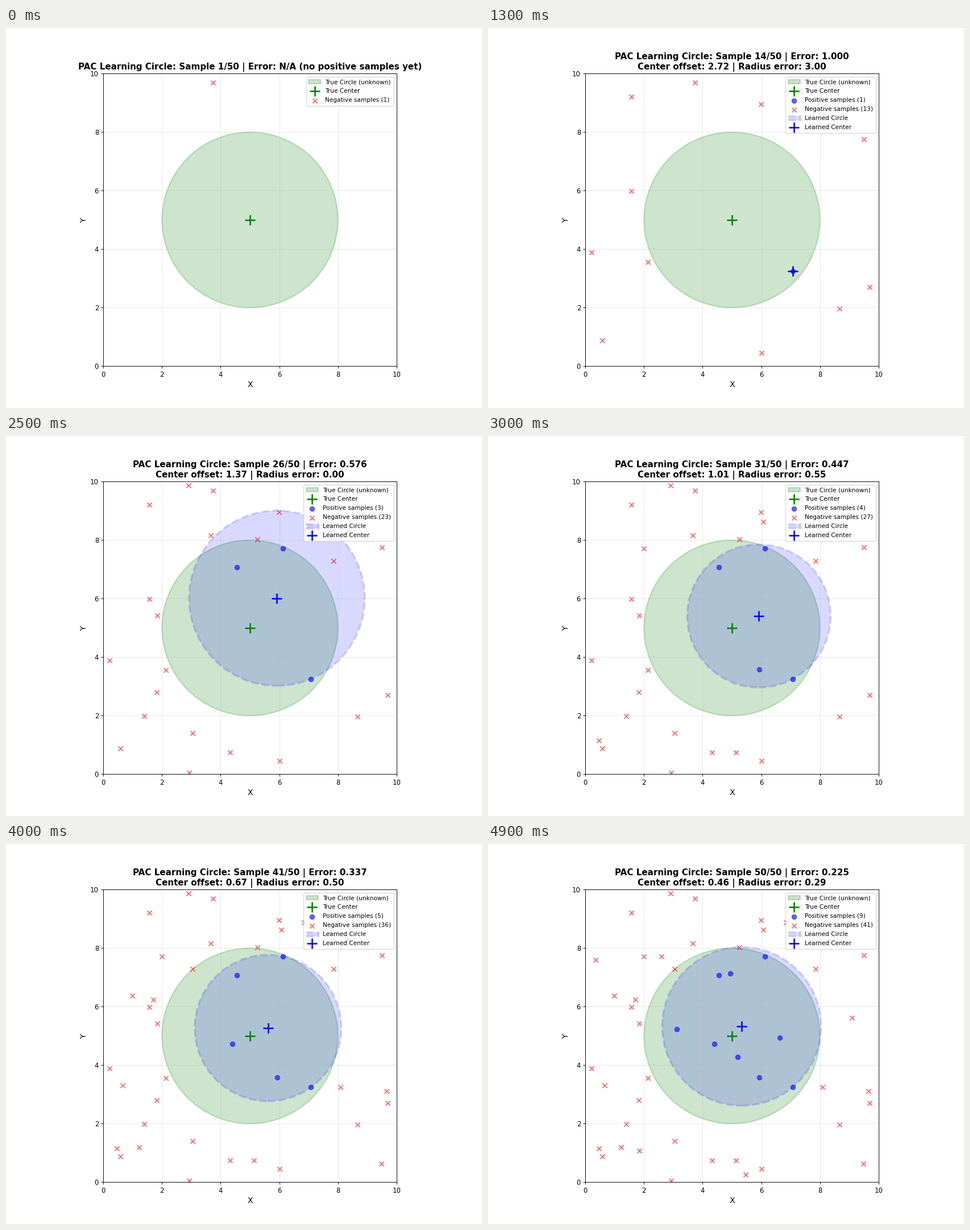
These frames come from a looping animation (837x669 px, 5000 ms). A matplotlib script:

```python
import math

import matplotlib.pyplot as plt
import numpy as np
from matplotlib.animation import FuncAnimation
from matplotlib.patches import Circle

WIDTH, HEIGHT, DPI = 837, 669, 83.7
SAMPLES, INTERVAL = 50, 100
TRUE_CENTER, TRUE_RADIUS = np.array([5.0, 5.0]), 3.0

plt.rcParams["font.family"] = "DejaVu Sans"

rng = np.random.RandomState(42)
xs = rng.rand(SAMPLES) * 10
ys = rng.rand(SAMPLES) * 10
points = np.column_stack([xs, ys])
inside = np.hypot(*(points - TRUE_CENTER).T) <= TRUE_RADIUS


def fit_circle(positives):
    """Centroid of the positives, reaching out to the farthest one."""
    center = positives.mean(axis=0)
    return center, np.hypot(*(positives - center).T).max()


def overlap_area(r1, r2, d):
    if d >= r1 + r2:
        return 0.0
    if d <= abs(r1 - r2):
        return math.pi * min(r1, r2) ** 2
    d1 = (d * d + r1 * r1 - r2 * r2) / (2 * d)
    d2 = d - d1
    segments = r1 * r1 * math.acos(d1 / r1) + r2 * r2 * math.acos(d2 / r2)
    return segments - d * math.sqrt(r1 * r1 - d1 * d1)


def relative_error(radius, offset):
    """Symmetric difference of both circles over the true area."""
    true_area = math.pi * TRUE_RADIUS ** 2
    shared = overlap_area(TRUE_RADIUS, radius, offset)
    return (true_area + math.pi * radius ** 2 - 2 * shared) / true_area


def draw_center(center, color, label):
    ax.plot(*center, "+", color=color, markersize=15, markeredgewidth=2.2,
            label=label)


def draw_samples(group, color, marker, kind):
    if len(group):
        ax.scatter(*group.T, c=color, marker=marker, s=50, alpha=0.6,
                   label=f"{kind} samples ({len(group)})")


# A hair over the height keeps the pixel count from rounding down.
fig = plt.figure(figsize=(WIDTH / DPI, (HEIGHT + 0.001) / DPI), dpi=DPI)
ax = fig.add_axes([0.2045, 0.11, 0.616, 0.77])


def update(frame):
    count = frame + 1
    seen, hit = points[:count], inside[:count]
    positives = seen[hit]

    ax.clear()
    ax.set(xlim=(0, 10), ylim=(0, 10))
    ax.grid(True, alpha=0.3)
    ax.set_xlabel("X", fontsize=12)
    ax.set_ylabel("Y", fontsize=12)

    ax.add_patch(Circle(TRUE_CENTER, TRUE_RADIUS, color="green", alpha=0.2,
                        linewidth=2, label="True Circle (unknown)"))
    draw_center(TRUE_CENTER, "green", "True Center")
    draw_samples(positives, "blue", "o", "Positive")
    draw_samples(seen[~hit], "red", "x", "Negative")

    title = f"PAC Learning Circle: Sample {count}/{SAMPLES} | Error: "
    if len(positives):
        center, radius = fit_circle(positives)
        offset = math.hypot(*(center - TRUE_CENTER))
        ax.add_patch(Circle(center, radius, color="blue", alpha=0.15,
                            linestyle="--", linewidth=3,
                            label="Learned Circle"))
        draw_center(center, "blue", "Learned Center")
        title += (f"{relative_error(radius, offset):.3f}\n"
                  f"Center offset: {offset:.2f} | "
                  f"Radius error: {abs(TRUE_RADIUS - radius):.2f}")
    else:
        title += "N/A (no positive samples yet)"

    ax.set_title(title, fontsize=13, fontweight="bold")
    ax.legend(loc="upper right", fontsize=9, labelspacing=0.58,
              borderpad=0.44)
    return []


anim = FuncAnimation(fig, update, frames=SAMPLES, init_func=lambda: [],
                     interval=INTERVAL, repeat=True, repeat_delay=0)
plt.show()
```
